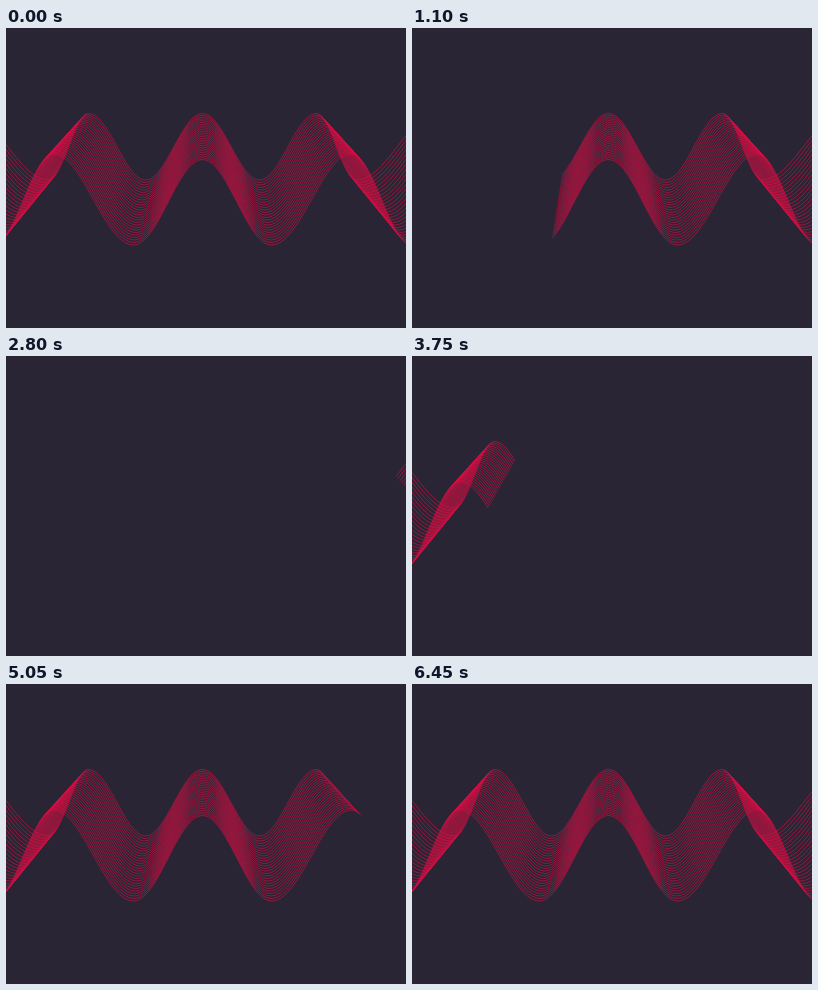
These frames come from a looping animation (400x300 px, 6.5 s). An HTML page with a canvas:

```html
<!DOCTYPE html>
<html>
<head>
<meta charset="utf-8">
<title>Wave</title>
<style>
  html, body { margin: 0; height: 100%; overflow: hidden; background: #292534; }
  canvas { display: block; }
</style>
</head>
<body>
<canvas id="stage" width="400" height="300"></canvas>
<script>
const ctx = document.getElementById("stage").getContext("2d");
const LOOP = 6500, LINES = 27, HALVES = 8, CENTER = 196.5;

// Turning points from the centre outwards as [distance, y]; both sides mirror.
const upper = [[0, 85.5], [57, 152], [114, 85.5], [154, 152], [236, 85]];
const lower = [[0, 131.5], [69, 217], [149, 126], [209, 217], [285, 131]];

const mix = (a, b, k) => a + (b - a) * k;
const clamp = p => Math.min(1, Math.max(0, p));

function point(wave, u) {
  const d = Math.abs(u - HALVES / 2);
  const i = Math.min(Math.floor(d), wave.length - 2), k = d - i;
  const [x0, y0] = wave[i], [x1, y1] = wave[i + 1];
  const x = mix(x0, x1, k) * Math.sign(u - HALVES / 2);
  return [CENTER + x, mix(y0, y1, (1 - Math.cos(Math.PI * k)) / 2)];
}

function strand(k, from, to) {
  const steps = Math.ceil((to - from) * 20);
  ctx.beginPath();
  for (let i = 0; i <= steps; i++) {
    const u = mix(from, to, i / steps);
    const [ax, ay] = point(upper, u), [bx, by] = point(lower, u);
    ctx.lineTo(mix(ax, bx, k), mix(ay, by, k));
  }
  ctx.stroke();
}

function ribbon(from, to) {
  if (to <= from) return;
  for (let i = 0; i < LINES; i++) strand(i / (LINES - 1), from, to);
}

function render(t) {
  ctx.fillStyle = "#292534";
  ctx.fillRect(0, 0, 400, 300);
  ctx.strokeStyle = "#e00f46";
  ctx.lineWidth = 0.6;
  const out = clamp(t / 3000), back = clamp((t - 2943) / 2740);
  // The wipe out runs slightly ahead in its middle; the return is steady.
  ribbon(HALVES * out + 0.3 * Math.sin(Math.PI * out) ** 2, HALVES);
  ribbon(0, HALVES * back);
}

const start = performance.now();
function tick() {
  render((performance.now() - start) % LOOP);
  requestAnimationFrame(tick);
}
tick();
</script>
</body>
</html>
```
